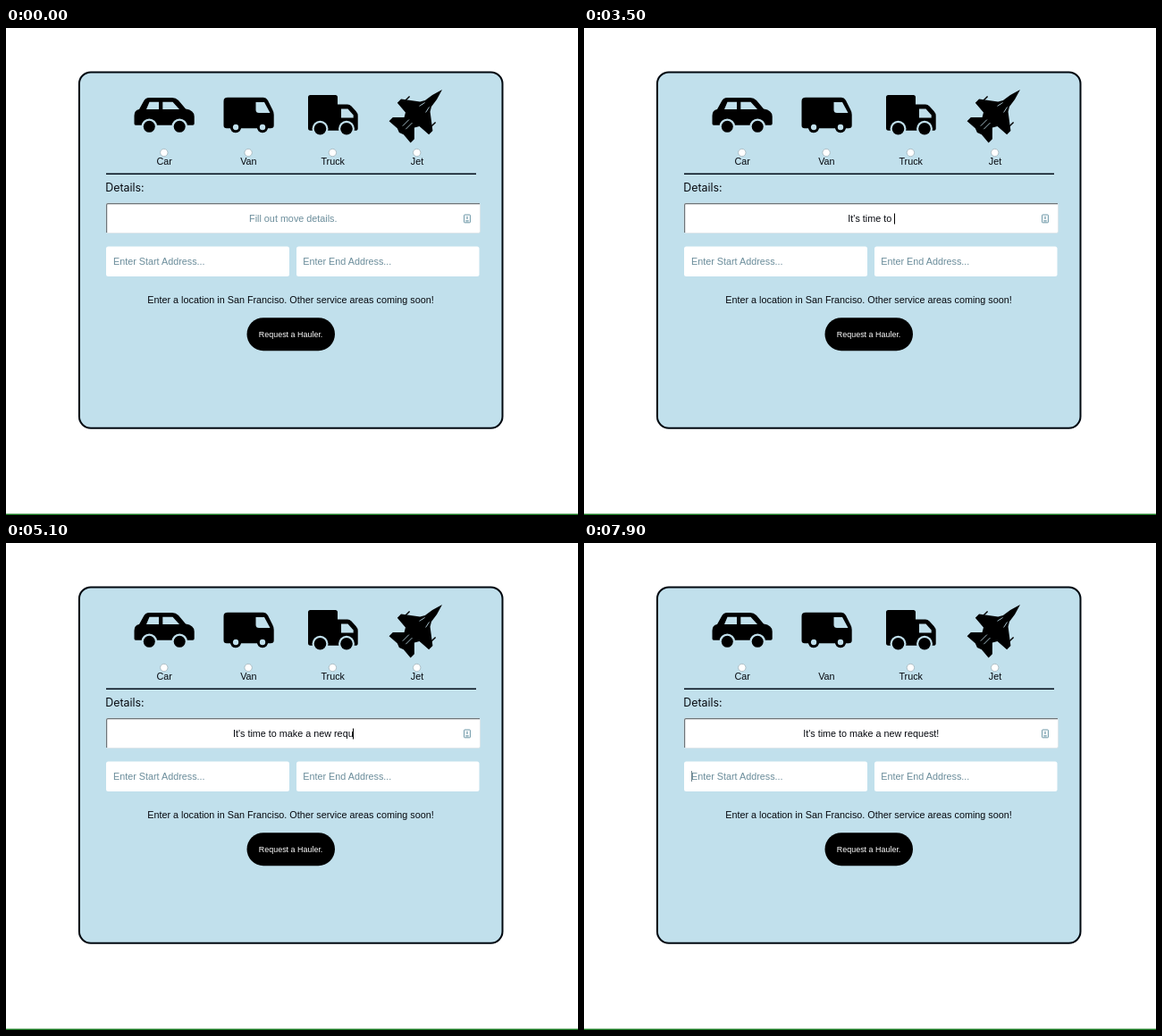
These frames come from a looping animation (640x545 px, 8000 ms). An HTML page:

```html
<!DOCTYPE html>
<html lang="en">
<head>
<meta charset="utf-8">
<title>Request form</title>
<style>
html, body { margin: 0; width: 100%; height: 100%; overflow: hidden; background: #fff; }
svg { display: block; }
text { font: 10.8px "Liberation Sans", Arial, sans-serif; fill: #06090f; white-space: pre; }
.mid { text-anchor: middle; }
.hint { fill: #6b8d9b; }
.bg { fill: #c1e0ec; }
.slit { stroke: #c1e0ec; fill: none; }
.caret { stroke: #000; stroke-width: 1; }
</style>
</head>
<body>
<svg width="640" height="545" viewBox="0 0 640 545">
  <rect y="543.6" width="640" height="1.4" fill="#197a22"/>
  <rect x="81.9" y="49.4" width="473.6" height="398.4" rx="13" class="bg" stroke="#000810" stroke-width="2"/>

  <g id="car">
    <path d="M143.5 107V98q0-6 5.5-7L154 82Q156 78 160 78H186Q190 78 193 81L201 90.5Q210.7 92 210.7 99V107Q210.7 108.7 209 108.7H145Q143.5 108.7 143.5 107Z"/>
    <path class="bg" d="M157 91L160.5 82.7H171V91ZM175.3 82.7H186.5L194 91H175.3Z"/>
    <circle class="bg" cx="160.3" cy="110.3" r="8.8"/><circle class="bg" cx="194.2" cy="110.3" r="8.8"/>
    <circle cx="160.3" cy="110.3" r="6.5"/><circle cx="194.2" cy="110.3" r="6.5"/>
  </g>

  <g id="van">
    <path d="M243.5 82Q243.5 77.8 248 77.8H288Q291 77.8 293 81L298 91Q299.7 94 299.7 97V109Q299.7 112.3 296 112.3H247Q243.5 112.3 243.5 109Z"/>
    <path class="bg" d="M279.5 83H289L295.5 95H283Q279.5 95 279.5 91.5Z"/>
    <circle cx="257" cy="111" r="6.2"/><circle cx="287" cy="111" r="6.2"/>
    <circle class="bg" cx="257" cy="111" r="3.2"/><circle class="bg" cx="287" cy="111" r="3.2"/>
  </g>

  <g id="truck">
    <path d="M338 77.5Q338 75 340.5 75H368.5Q371 75 371 77.5V85.5H382Q384.500 85.5 386.500 87.500L391.500 93Q393.700 95.500 393.700 98V112.500Q393.700 114.800 391 114.800H340.500Q338 114.800 338 112Z"/>
    <path class="bg" d="M375 90.5H382.500L388.700 97.500V100.500H375Z"/>
    <circle class="bg" cx="351.5" cy="112.8" r="9"/><circle class="bg" cx="381" cy="112.8" r="9"/>
    <circle cx="351.5" cy="112.8" r="6.8"/><circle cx="381" cy="112.8" r="6.8"/>
  </g>

  <g id="jet" transform="translate(488 69) rotate(135)">
    <path d="M0 0L12 3.5 22 5 27 8 40 25 46 25 47 11 52 8 61 17 67 17 66 5 68 0 66-5 67-17 61-17 52-8 47-11 46-25 40-25 27-8 22-5 12-3.500Z"/>
    <path d="M31 20.500H39M31-20.500H39" stroke="#000" stroke-width="1.4"/>
    <path class="slit" d="M24 3.500L31 5M24-3.500L31-5M50 2.500H60M50-2.500H60" stroke-width=".8"/>
  </g>

  <g id="choices"></g>
  <path d="M112 163.200H526" stroke="#000c18" stroke-width="1.5"/>
  <text x="111.3" y="183.300" style="font:12.4px Inter,sans-serif">Details:</text>

  <rect x="112" y="196" width="418.500" height="33.500" rx="2" fill="#fff" stroke="#d9dfe2" stroke-width=".6"/>
  <path d="M112.600 229V198Q112.600 196.600 114 196.600H530" fill="none" stroke="#6d7478" stroke-width="1.2"/>
  <g fill="none" stroke="#6b96a6">
    <rect x="512.600" y="209" width="6.800" height="8.800" rx=".6"/>
    <path d="M516 210.800V214M514.300 215.800H517.700" stroke-width="1.2"/>
  </g>
  <text id="details" class="mid" x="321.300" y="217"></text>

  <rect x="112" y="244.500" width="205" height="33.500" rx="2.500" fill="#fff"/>
  <rect x="325" y="244.500" width="204.500" height="33.500" rx="2.500" fill="#fff"/>
  <text class="hint" x="120" y="264.800">Enter Start Address...</text>
  <text class="hint" x="332.300" y="264.800">Enter End Address...</text>
  <path id="caret" class="caret"/>

  <text class="mid" x="318.500" y="308.200">Enter a location in San Franciso. Other service areas coming soon!</text>
  <rect x="269.500" y="324.200" width="98.500" height="37" rx="18.500"/>
  <text class="mid" x="318.600" y="346" style="font-size:8.95px;fill:#fff">Request a Hauler.</text>
</svg>
<script>
const $ = id => document.getElementById(id);
const LOOP = 8000, MESSAGE = "It's time to make a new request!";
// [time in ms, characters typed]
const TYPING = [[2400, 0], [3500, 13], [4200, 20], [5100, 28], [5600, 32]];

$('choices').innerHTML = ['Car', 'Van', 'Truck', 'Jet'].map((name, i) => {
  const x = 176.8 + i * 94.3;
  return `<circle cx="${x}" cy="139.500" r="4.200" fill="#fff" stroke="#9fb0b8" stroke-width=".8"/>
    <text class="mid" x="${x + 0.3}" y="153">${name}</text>`;
}).join('');
const radios = $('choices').querySelectorAll('circle');

function typedCount(t) {
  for (let i = 1; i < TYPING.length; i++) {
    const [t0, n0] = TYPING[i - 1], [t1, n1] = TYPING[i];
    if (t < t1) return Math.max(0, Math.floor(n0 + (n1 - n0) * (t - t0) / (t1 - t0) + 1e-6));
  }
  return MESSAGE.length;
}

function caretShown(t) {
  if (t < 1700 || t >= 7100 && t < 7800) return false;
  if (t < 2400) return t < 2300;
  return t < 5600 || t >= 7800 || (t - 5600) % 1000 < 500;
}

function draw(t) {
  const count = typedCount(t), details = $('details'), caret = $('caret');
  details.textContent = count ? MESSAGE.slice(0, count) : 'Fill out move details.';
  details.classList.toggle('hint', !count);

  const onAddress = t >= 7800;
  const x = onAddress ? 120.5 : 321.5 + (count ? details.getComputedTextLength() / 2 : 0);
  caret.setAttribute('d', `M${Math.floor(x) + 0.5} ${onAddress ? 255 : 207.5}v12`);
  caret.style.stroke = onAddress ? '#71858e' : '#000';
  caret.style.visibility = caretShown(t) ? 'visible' : 'hidden';

  radios[0].style.stroke = t >= 6000 && t < 6900 ? '#42525a' : '';
  radios[1].style.visibility = onAddress ? 'hidden' : 'visible';
}

const start = performance.now();
function tick() {
  draw((performance.now() - start) % LOOP);
  requestAnimationFrame(tick);
}
tick();
</script>
</body>
</html>
```
